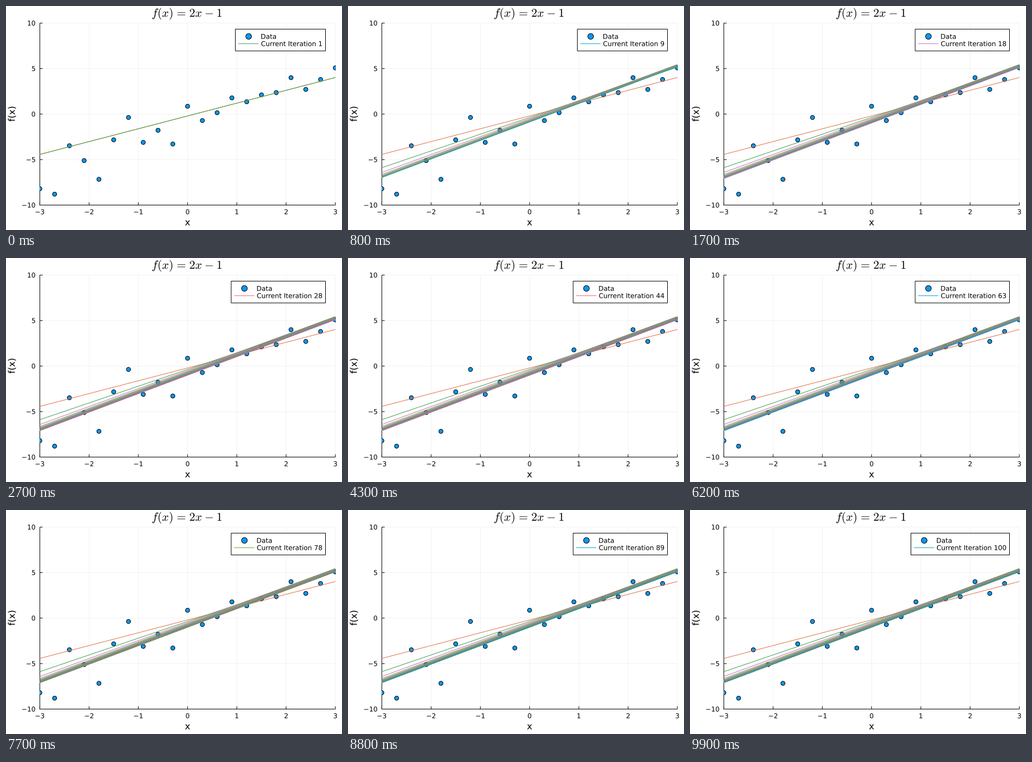
Animation, 600 px wide and 400 px high, one loop 10000 ms. Source, as a matplotlib script:

```python
import numpy as np
import matplotlib.pyplot as plt
from matplotlib.animation import FuncAnimation
from matplotlib.collections import LineCollection
from matplotlib.patches import Circle, PathPatch, Rectangle
from matplotlib.path import Path
from matplotlib.textpath import TextPath

PX = 0.72  # points per pixel at 100 dpi
STEPS, RATE = 100, 0.01
LEFT, RIGHT, TOP, BOTTOM = 60.4, 588.1, 30.5, 355.5
SMALL, LABEL, TITLE = 11.85, 16.29, 21.2
HALF_CAP = 0.3645 * SMALL
DIGIT = 0.636 * SMALL

# Legend: three equal gaps, inset by a thirtieth of the plot area
ROW = 12.96
KEY_TOP = TOP + (BOTTOM - TOP) / 30
KEY_RIGHT = RIGHT - (RIGHT - LEFT) / 30
KEY_LEFT, KEY_TEXT = 409.6, 456.0

PALETTE = [
    "#009afa", "#e36f47", "#3ea44e", "#c371d2", "#ac8e18", "#00aaae",
    "#ed5e93", "#c68225", "#00a98d", "#8e971e", "#00a9cc", "#9b7fe9",
    "#618df6", "#f06073", "#dd65b6", "#6c9f33",
]

plt.rcParams.update({
    "font.family": "DejaVu Sans",
    "mathtext.fontset": "cm",
    "path.snap": False,
})


def to_x(x):
    return LEFT + (np.asarray(x) + 3) / 6 * (RIGHT - LEFT)


def to_y(y):
    return BOTTOM - (np.asarray(y) + 10) / 20 * (BOTTOM - TOP)


# Noisy samples of 2x - 1
xs = np.linspace(-3, 3, 21)
ys = np.array([-8.2, -8.8, -3.48, -5.11, -7.17, -2.83, -0.37, -3.11, -1.78,
               -3.29, 0.86, -0.71, 0.15, 1.78, 1.35, 2.11, 2.36, 4.0, 2.71,
               3.8, 5.08])


def descend():
    """Lines fitted by gradient descent, as pixel segments."""
    a = b = 0.0
    ends = np.array([-3, 3])
    segments = []
    for _ in range(STEPS):
        error = a * xs + b - ys
        a -= RATE * np.sum(error * xs)
        b -= RATE * np.sum(error)
        segments.append(np.column_stack([to_x(ends), to_y(a * ends + b)]))
    return segments


fig = plt.figure(figsize=(6, 4), dpi=100, facecolor="white")
ax = fig.add_axes([0, 0, 1, 1])
ax.set_xlim(0, 600)
ax.set_ylim(400, 0)
ax.axis("off")


def stroke(x, y, z, width=1.0, color="black", **kw):
    return ax.plot(x, y, color=color, lw=width * PX, zorder=z,
                   solid_capstyle="butt", **kw)[0]


def outline(x, y, s, size=SMALL, align=0.5, upright=False):
    """Glyph outlines on baseline y; align runs from 0 (left) to 1 (right)."""
    glyphs = TextPath((0, 0), s, size=size)
    u, v = glyphs.vertices.T
    box = glyphs.get_extents()
    u = u - box.x0 - align * box.width
    pts = (x - v, y - u) if upright else (x + u, y - v)
    return Path(np.column_stack(pts), glyphs.codes)


def text(*args, **kw):
    return ax.add_patch(PathPatch(outline(*args, **kw), fc="black", lw=0,
                                  zorder=9))


def dot(x, y, radius, z):
    return ax.add_patch(Circle((x, y), radius, fc=PALETTE[0], ec="black",
                               lw=PX, zorder=z))


def number(v):
    return str(v).replace("-", "\u2212")


for v in range(-3, 4):
    x = to_x(v)
    stroke([x, x], [TOP, BOTTOM], 1, 0.5, alpha=0.1)
    stroke([x, x], [BOTTOM, BOTTOM - 5], 2)
    text(x, 371.8, number(v))
for v in range(-10, 11, 5):
    y = to_y(v)
    stroke([LEFT, RIGHT], [y, y], 1, 0.5, alpha=0.1)
    stroke([LEFT, LEFT + 5], [y, y], 2)
    text(52, y + HALF_CAP, number(v), align=1)
stroke([LEFT, LEFT], [TOP, BOTTOM + 0.5], 2)
stroke([LEFT - 0.5, RIGHT], [BOTTOM, BOTTOM], 2)

# Extra space brings the operators to TeX's own spacing
text(323, 19.2, r"$f(x)\hspace{0.117}=\hspace{0.117}2x"
                r"\hspace{0.053}-\hspace{0.053}1$", TITLE)
text(324.2, 391.7, "x", LABEL)
text(15.8, 193, "f(x)", LABEL, upright=True)

clip = Rectangle((60, 30), 529, 326, transform=ax.transData)
for x, y in zip(to_x(xs), to_y(ys)):
    dot(x, y, 3.7, 3).set_clip_path(clip)

fits = LineCollection([], linewidths=PX, zorder=4)
ax.add_collection(fits, autolim=False)

box = ax.add_patch(Rectangle((KEY_LEFT, KEY_TOP), KEY_RIGHT - KEY_LEFT,
                             3 * ROW, fc="white", ec="black", lw=PX,
                             zorder=6))
row1, row2 = KEY_TOP + ROW, KEY_TOP + 2 * ROW
key_dot = dot(433.3, row1, 5.1, 8)
key_line = stroke([415, 451], [row2, row2], 8)
key_data = text(KEY_TEXT, row1 + HALF_CAP, "Data", align=0)
key_fit = text(KEY_TEXT, row2 + HALF_CAP, "Current", align=0)

path = descend()


def draw(frame):
    n = frame + 1
    colors = [PALETTE[k % 16] for k in range(1, n + 2)]
    fits.set_segments(path[:n] + [path[n - 1]])
    fits.set_color(colors)

    # The legend grows leftwards with the counter
    shift = DIGIT * (len(str(n)) - 1)
    box.set_x(KEY_LEFT - shift)
    box.set_width(KEY_RIGHT - KEY_LEFT + shift)
    key_dot.center = 433.3 - shift, row1
    key_line.set_xdata([415 - shift, 451 - shift])
    key_line.set_color(colors[-1])
    left = KEY_TEXT - shift
    key_data.set_path(outline(left, row1 + HALF_CAP, "Data", align=0))
    key_fit.set_path(outline(left, row2 + HALF_CAP,
                             f"Current Iteration {n}", align=0))
    return fits, box, key_dot, key_line, key_data, key_fit


anim = FuncAnimation(fig, draw, frames=STEPS, interval=100, repeat=True,
                     repeat_delay=0, blit=False)
plt.show()
```
